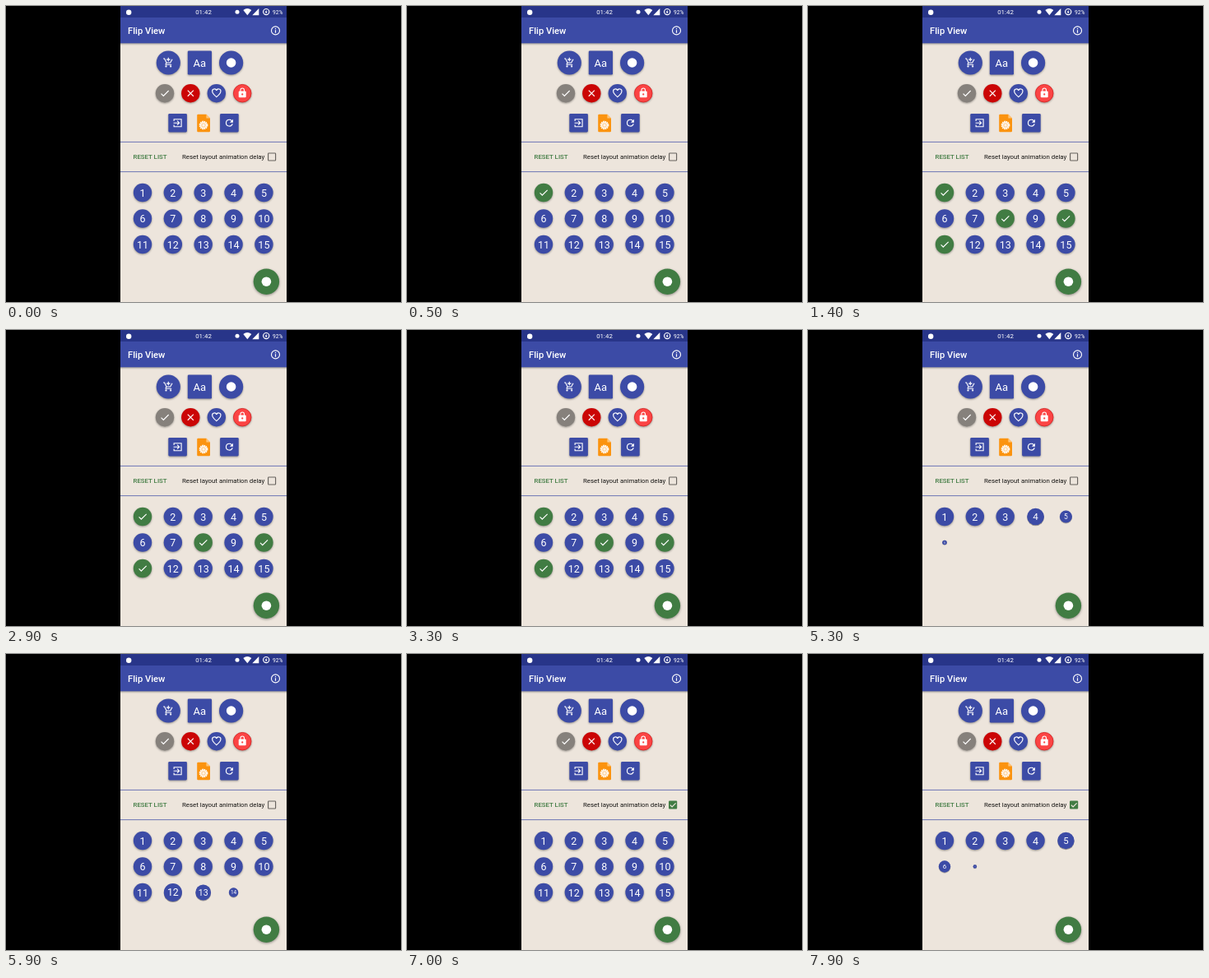
Write an HTML page that moves like this. It is 480 px wide and 360 px high and loops after 8 s.

```html
<!DOCTYPE html>
<html lang="en">
<head>
<meta charset="utf-8">
<title>Flip View</title>
<style>
  html, body { margin: 0; width: 100%; height: 100%; overflow: hidden; background: #000; }
  svg { display: block; width: 100vw; height: 100vh; font-family: Roboto, sans-serif; }
  .blue { fill: #3c4ba6; }
  .green { fill: #417c43; }
  .white { fill: #fff; }
  .line { fill: none; stroke: #fff; stroke-width: 2; }
  .lift { filter: drop-shadow(0 1px .8px rgba(0, 0, 0, .36)); }
  .mid { text-anchor: middle; }
</style>
</head>
<body>
<svg viewBox="0 0 480 360">
  <defs>
    <linearGradient id="shade" x2="0" y2="1">
      <stop stop-color="#000" stop-opacity=".3"/>
      <stop offset="1" stop-color="#000" stop-opacity="0"/>
    </linearGradient>
    <!-- 24-unit icons, centred and scaled to the screen density -->
    <g id="check" transform="scale(.561) translate(-12 -12)">
      <path class="white" d="M9 16.2L4.8 12l-1.4 1.4L9 19 21 7l-1.4-1.4z"/>
    </g>
    <g id="cart" transform="scale(.561) translate(-12 -12)">
      <path class="line" d="M1 3h2.7l4.2 9h8.3l4.2-7.6M8 12l-1.8 3.2Q6 16 7 16h12M12 1v8M8 5h8"/>
      <circle class="white" cx="7" cy="20" r="2"/>
      <circle class="white" cx="17" cy="20" r="2"/>
    </g>
    <g id="close" transform="scale(.561) translate(-12 -12)">
      <path class="line" d="M5.7 5.7L18.3 18.3M18.3 5.7L5.7 18.3"/>
    </g>
    <g id="heart" transform="scale(.561) translate(-12 -12)">
      <path class="line" d="M12 20C6 14.6 3 12 3 8.5A4.6 4.6 0 0 1 12 6.2A4.6 4.6 0 0 1 21 8.5C21 12 18 14.6 12 20Z"/>
    </g>
    <g id="lock" transform="scale(.561) translate(-12 -12)">
      <path class="white" fill-rule="evenodd" d="M18 8h-1V6A5 5 0 0 0 7 6v2H6a2 2 0 0 0-2 2v10a2 2 0 0 0 2 2h12a2 2 0 0 0 2-2V10a2 2 0 0 0-2-2zM12 17a2 2 0 1 1 0-4 2 2 0 0 1 0 4zM15.1 8H8.9V6a3.1 3.1 0 0 1 6.2 0z"/>
    </g>
    <g id="enter" transform="scale(.561) translate(-12 -12)">
      <path class="line" d="M4 8V4h16v16H4v-4M3 12h12.5M11 7.5l4.5 4.5-4.5 4.5"/>
    </g>
    <g id="refresh" transform="scale(.561) translate(-12 -12)">
      <path class="white" d="M17.65 6.35C16.2 4.9 14.21 4 12 4a8 8 0 1 0 7.73 10h-2.08A6 6 0 1 1 12 6c1.66 0 3.14.69 4.22 1.78L13 11h7V4z"/>
    </g>
  </defs>

  <rect width="480" height="360"/>
  <rect x="139" width="202" height="360" fill="#ede5dc"/>
  <rect x="139" y="45" width="202" height="3" fill="url(#shade)"/>
  <rect class="blue" x="139" y="14" width="202" height="31.3"/>
  <rect x="139" width="202" height="14" fill="#283589"/>

  <!-- status bar -->
  <g class="white">
    <circle cx="149.2" cy="7.8" r="3.2"/>
    <text class="mid" x="240" y="10.4" font-size="7.9">01:42</text>
    <circle cx="281" cy="7.2" r="2.5"/>
    <path d="M288.3 5Q293.3 1.2 298.3 5L293.3 11.2Z"/>
    <path d="M307.3 3v8.2h-8z"/>
    <circle cx="316.2" cy="7.1" r="3.6" fill="none" stroke="#fff" stroke-width="1.2"/>
    <path d="M316.8 4.4l-2.2 3.3h1.3l-.4 2.2 2.3-3.2h-1.4z"/>
    <text x="324" y="9.7" font-size="6.7">92%</text>
  </g>

  <!-- app bar -->
  <text class="white" x="148" y="34.2" font-size="11.2" font-weight="500">Flip View</text>
  <circle cx="327.5" cy="29.9" r="5" fill="none" stroke="#fff" stroke-width="1.1"/>
  <path class="white" d="M326.9 27h1.2v1.2h-1.2zM326.9 29.3h1.2v3.5h-1.2z"/>

  <!-- top buttons -->
  <g class="lift">
    <circle class="blue" cx="197.3" cy="69" r="14.6"/>
    <rect class="blue" x="220.8" y="54.4" width="29.2" height="29.2" rx="1.4"/>
    <circle class="blue" cx="273.6" cy="69" r="14.6"/>
    <circle cx="193" cy="106.2" r="11.2" fill="#86817c"/>
    <circle cx="224.3" cy="106.2" r="11.2" fill="#cb0505"/>
    <circle class="blue" cx="255.8" cy="106.2" r="11.2"/>
    <circle cx="287.2" cy="106.2" r="10.8" fill="#fb4444" stroke="#d5201f" stroke-width=".8"/>
    <rect class="blue" x="197.3" y="130.9" width="22.6" height="22.6" rx="1.4"/>
    <rect class="blue" x="260.1" y="130.9" width="22.6" height="22.6" rx="1.4"/>
  </g>
  <use href="#cart" x="197.3" y="69"/>
  <text class="white mid" x="235.4" y="73.8" font-size="13">Aa</text>
  <circle class="white" cx="273.6" cy="69" r="5.8"/>
  <use href="#check" x="193" y="106.2"/>
  <use href="#close" x="224.3" y="106.2"/>
  <use href="#heart" x="255.8" y="106.2"/>
  <use href="#lock" x="287.2" y="105.7"/>
  <use href="#enter" x="208.6" y="142.2"/>
  <use href="#refresh" x="271.4" y="142.2"/>

  <path d="M233.4 131.8h10l4.6 4.7v15.6a1.2 1.2 0 0 1-1.2 1.2h-13.4a1.2 1.2 0 0 1-1.2-1.2v-19.1a1.2 1.2 0 0 1 1.2-1.2z" fill="#fb930f"/>
  <path d="M243.4 131.8v4.7h4.6z" fill="#ffc477"/>
  <circle cx="240" cy="145" r="4.7" fill="none" stroke="#fff" stroke-width="1.4" stroke-dasharray="1.6 .86"/>
  <circle cx="240" cy="145" r="4.3" fill="#fff4e6"/>
  <circle cx="240" cy="145" r="2.2" fill="none" stroke="#fdbb6b" stroke-width=".7"/>

  <!-- options row -->
  <path d="M139 165.4h202M139 201.6h202" stroke="#3c4ba6" stroke-opacity=".8" stroke-width=".9"/>
  <text class="green" x="154.5" y="186.3" font-size="7.86" font-weight="500">RESET LIST</text>
  <text x="214" y="186.3" font-size="7.86" fill="#151412">Reset layout animation delay</text>
  <rect id="unticked" x="318.6" y="179" width="9" height="9" rx=".7" fill="none" stroke="#67625d" stroke-width="1.15"/>
  <g id="ticked" visibility="hidden">
    <rect class="green" x="318" y="178.4" width="10.2" height="10.2" rx="1.1"/>
    <path d="M319.8 183.6l2.3 2.3 4.5-4.6" fill="none" stroke="#ede5dc" stroke-width="1.2"/>
  </g>

  <g id="list"></g>

  <g style="filter: drop-shadow(0 1.8px 1.6px rgba(0,0,0,.4))">
    <circle class="green" cx="316.4" cy="335.2" r="15.7"/>
  </g>
  <circle class="white" cx="316.4" cy="335.2" r="5.8"/>
</svg>

<script>
  const LOOP = 8000, FLIP = 250;
  const STEP = 70, GROW = 235;              // list entrance: stagger and duration
  const TAPS = { 1: 100, 8: 400, 10: 700, 11: 1000 };
  const RESETS = [{ hide: 3900, show: 4919 }, { hide: 7300, show: 7455 }];
  const TICK = 6500;

  // The screen refreshes in bursts: first time, last time, count.
  const BURSTS = [[0, 0, 1], [100, 900, 6], [1200, 2100, 6], [2300, 3300, 6], [3500, 3500, 1],
    [3900, 4900, 6], [5100, 5900, 5], [6200, 7000, 6], [7300, 7900, 4]];
  const beats = BURSTS.flatMap(([a, b, n]) =>
    Array.from({ length: n }, (_, i) => Math.round((a + (b - a) * i / (n - 1 || 1)) / 100) * 100));

  const $ = id => document.getElementById(id);
  const clamp = v => Math.min(1, Math.max(0, v));
  const easeOut = v => 1 - (1 - v) ** 2;
  const show = (el, on) => el.setAttribute('visibility', on ? 'inherit' : 'hidden');

  $('list').innerHTML = Array.from({ length: 15 }, (_, i) => {
    const x = 166 + i % 5 * 36.85, y = 227 + Math.floor(i / 5) * 31.5;
    return `<g transform="translate(${x} ${y})"><g class="item">
      <g class="front"><circle class="blue lift" r="11.2"/>
        <text class="white mid" y="4.5" font-size="12.5">${i + 1}</text></g>
      <g class="back"><circle class="green lift" r="11.2"/>
        <g class="mark"><use href="#check"/></g></g>
    </g></g>`;
  }).join('');

  const items = [...document.querySelectorAll('.item')].map(el => ({
    el,
    front: el.querySelector('.front'),
    back: el.querySelector('.back'),
    mark: el.querySelector('.mark')
  }));

  function draw(t) {
    const reset = RESETS.filter(r => t >= r.hide).pop();
    items.forEach((item, i) => {
      const size = reset ? easeOut(clamp((t - reset.show - i * STEP) / GROW)) : 1;
      const tap = TAPS[i + 1];
      const turn = tap === undefined || reset ? 0 : clamp((t - tap) / FLIP);
      const wide = Math.abs(Math.cos(turn * Math.PI));
      item.el.setAttribute('transform', `scale(${size * wide} ${size})`);
      show(item.el, size > 0);
      show(item.front, turn < .5);
      show(item.back, turn >= .5);
      item.mark.setAttribute('transform', `scale(${clamp(turn * 2 - 1)})`);
    });
    show($('ticked'), t >= TICK);
    show($('unticked'), t < TICK);
  }

  const start = performance.now();
  function frame() {
    const t = (performance.now() - start) % LOOP;
    draw(beats.filter(b => b <= t).pop());
    requestAnimationFrame(frame);
  }
  frame();
</script>
</body>
</html>
```
